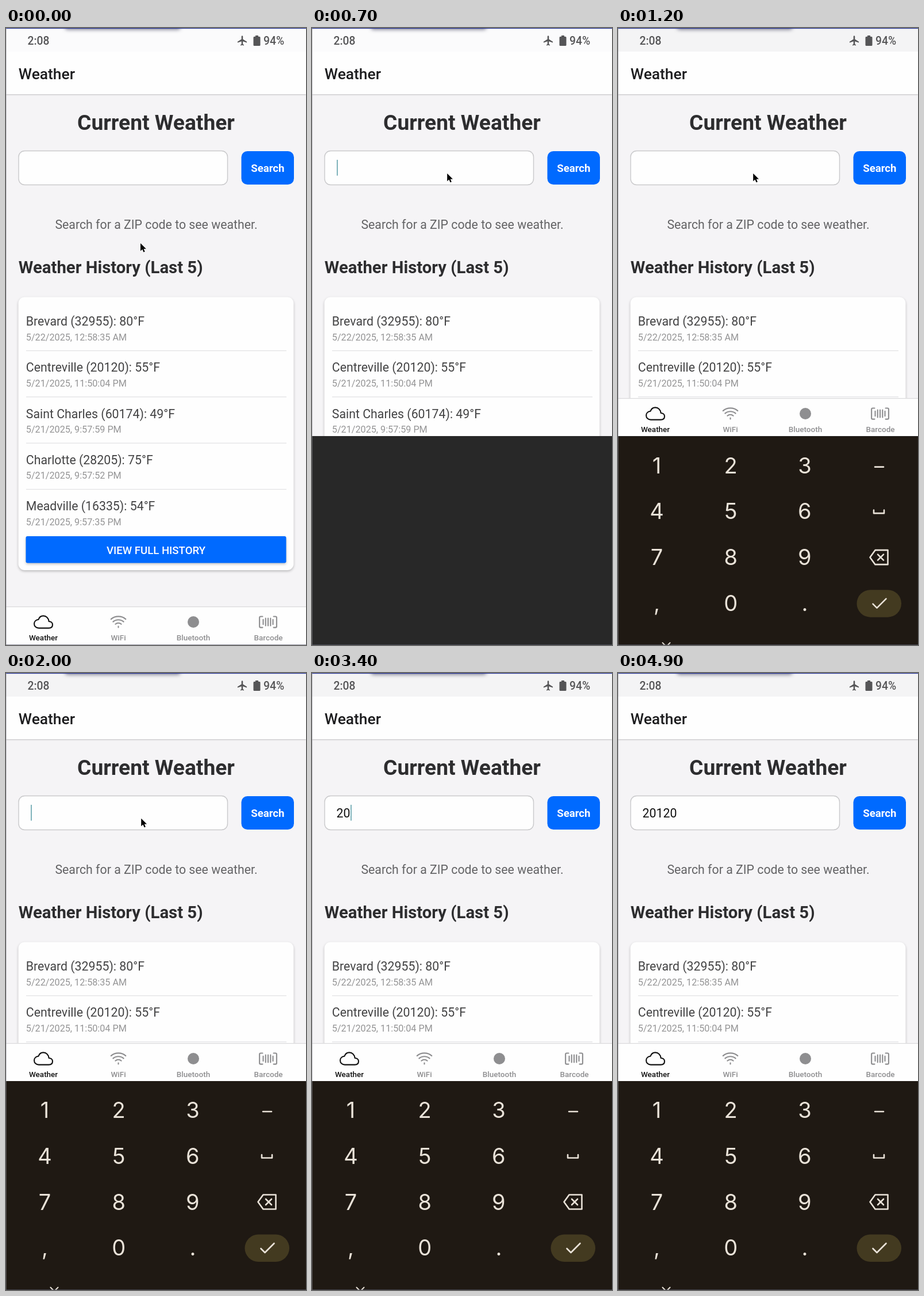
These frames come from a looping animation (522x1072 px, 5 s). An HTML page:

```html
<!DOCTYPE html>
<html lang="en">
<head>
<meta charset="utf-8">
<title>Weather search</title>
<style>
  html, body { margin: 0; width: 100%; height: 100%; overflow: hidden; background: #f5f4f6; }
  svg { display: block; width: 100vw; height: 100vh; font-family: Roboto, Arial, sans-serif; }
  .mid { text-anchor: middle; }
  .line { fill: none; stroke-linecap: round; stroke-linejoin: round; }
  .item { font-size: 21.3px; fill: #434344; }
  .date { font-size: 16.2px; fill: #949495; }
  .tab { font-size: 13.5px; font-weight: 500; }
  .key { font: 38px Inter, Roboto, sans-serif; fill: #e9e2d8; }
  .soft { filter: drop-shadow(0 2px 2px rgba(0, 0, 0, .24)); }
  .flat { filter: drop-shadow(0 1px 1px rgba(0, 0, 0, .22)); }
  .notch { filter: drop-shadow(0 2px 3px rgba(20, 20, 50, .5)); }
</style>
</head>
<body>
<svg viewBox="0 0 522 1072">
  <rect width="522" height="1072" fill="#f5f4f6"/>

  <!-- header -->
  <rect class="flat" width="522" height="115" fill="#fefefe"/>
  <rect id="status" width="522" height="41"/>
  <rect class="notch" x="103" y="-8" width="200" height="9" rx="4" fill="#222234"/>
  <rect width="522" height="1.2" fill="#263391"/>
  <g fill="#555557" font-size="19.3" font-weight="500">
    <text x="37.5" y="28.5">2:08</text>
    <text x="448" y="28.5">94%</text>
    <path transform="translate(401.2 11.8) scale(.85)" d="M21 16v-2l-8-5V3.5c0-.83-.67-1.5-1.5-1.5S10 2.67 10 3.5V9l-8 5v2l8-2.5V19l-2 1.5V22l3.5-1 3.5 1v-1.5L13 19v-5.5l8 2.5z"/>
    <path d="M434 15v-2h5v2h2q1.5 0 1.5 1.5v13q0 1.5-1.5 1.5h-9q-1.5 0-1.5-1.5v-13q0-1.5 1.5-1.5z"/>
  </g>
  <text x="21.8" y="89" font-size="26.4" font-weight="500" fill="#1c1c1e">Weather</text>

  <!-- search -->
  <text class="mid" x="261" y="177" font-size="37.2" font-weight="700" fill="#2d2d2f">Current Weather</text>
  <rect x="22" y="213.5" width="363.5" height="59" rx="10.5" fill="#fefefe" stroke="#c9c9cb" stroke-width="1.4"/>
  <rect x="409.5" y="214" width="91.5" height="58" rx="10.5" fill="#006aff"/>
  <text class="mid" x="455.3" y="250" font-size="18.6" font-weight="700" fill="#fff">Search</text>
  <text class="mid" x="261.5" y="348.5" font-size="21.3" fill="#636365">Search for a ZIP code to see weather.</text>
  <text id="zip" x="42.6" y="251" font-size="21.3" fill="#111"></text>
  <rect id="caret" y="229" width="2" height="27.5" fill="#7fb3bb"/>

  <!-- history -->
  <text x="21.8" y="426" font-size="29.3" font-weight="700" fill="#2d2d2f">Weather History (Last 5)</text>
  <rect class="soft" x="21.5" y="467.5" width="479" height="474.5" rx="11" fill="#fefefe"/>
  <g id="history"></g>
  <rect class="soft" x="34.5" y="883" width="453" height="46.5" rx="3" fill="#006aff"/>
  <text class="mid" x="261" y="914" font-size="18.6" font-weight="500" fill="#fff">VIEW FULL HISTORY</text>

  <!-- keyboard -->
  <rect id="backdrop" y="709" width="522" height="363" fill="#282828"/>
  <g id="keyboard">
    <rect y="709" width="522" height="363" fill="#1f1913"/>
    <g id="keys"></g>
    <rect x="415.5" y="975.5" width="77.5" height="47.5" rx="23.7" fill="#433a20"/>
    <g class="line" stroke="#e9e2d8" stroke-width="2.6">
      <path d="M447 762h15M445 837v5.5h18v-5.5"/>
      <path d="M438.5 919l9-12.5h22v25h-22zM452 914l10 10m0-10l-10 10"/>
      <path d="M443.5 1000l7 7 16-16"/>
      <path d="M77.5 1067.5l6.5 6.5 6.5-6.5" stroke-width="2"/>
    </g>
  </g>

  <!-- tab bar -->
  <g id="tabs">
    <rect y="1005.5" width="522" height="65.5" fill="#fefefe"/>
    <rect y="1005" width="522" height="1.2" fill="#d9d9db"/>
    <g class="line" stroke="#8e8e90" stroke-width="32">
      <path stroke="#111" transform="translate(48 1015) scale(.0665)" d="M400 240c-8.9-89.5-71-144-144-144-69 0-113.4 48.2-128 96-60 6-112 43.6-112 112 0 66 54 112 120 112h260c55 0 100-27.4 100-88 0-59.8-53-85.8-96-88z"/>
      <path transform="translate(178.5 1015) scale(.0665)" d="M332 311a115 115 0 0 0-153 0M393 250c-75-68-200-68-275 0M448 182c-106-95-277-95-384 0M256 370v28"/>
      <path transform="translate(439 1015) scale(.0665)" d="M400 400h48a32 32 0 0 0 32-32v-224a32 32 0 0 0-32-32h-48M112 112h-48a32 32 0 0 0-32 32v224a32 32 0 0 0 32 32h48M384 192v128M320 160v192M256 160v192M192 160v192M128 192v128"/>
    </g>
    <circle cx="326" cy="1032" r="10" fill="#8e8e90"/>
    <g id="labels"></g>
  </g>
  <rect width="1" height="1072" fill="#8a8a92" opacity=".45"/>
  <rect y="1071" width="522" height="1" fill="#55586a" opacity=".6"/>

  <path id="mouse" d="M0 0v13.5l3.2-2.9 2.2 5 2.3-1-2.2-4.9h4.3z" fill="#000" stroke="#fff" stroke-width="1" paint-order="stroke"/>
</svg>
<script>
  const $ = id => document.getElementById(id);
  const text = (cls, x, y, s, extra = '') => `<text class="${cls}" x="${x}" y="${y}" ${extra}>${s}</text>`;

  $('history').innerHTML = [
    ['Brevard (32955): 80°F', '5/22/2025, 12:58:35 AM'],
    ['Centreville (20120): 55°F', '5/21/2025, 11:50:04 PM'],
    ['Saint Charles (60174): 49°F', '5/21/2025, 9:57:59 PM'],
    ['Charlotte (28205): 75°F', '5/21/2025, 9:57:52 PM'],
    ['Meadville (16335): 54°F', '5/21/2025, 9:57:35 PM']
  ].map(([place, date], i) => {
    const y = 80.3 * i;
    const rule = i < 4 ? `<rect x="35" y="${560 + y}" width="453" height="1.3" fill="#e3e3e5"/>` : '';
    return text('item', 34.8, 517 + y, place) + text('date', 34.8, 542.5 + y, date) + rule;
  }).join('');

  $('keys').innerHTML = [...'123456789,0.'].map((c, i) =>
    text('key mid', 67.5 + 128.7 * (i % 3), 773 + 79.8 * Math.floor(i / 3), c)).join('');

  $('labels').innerHTML = ['Weather', 'WiFi', 'Bluetooth', 'Barcode'].map((s, i) =>
    text('tab mid', 65 + 130.5 * i, 1064, s, `fill="${i ? '#8e8e90' : '#111'}"`)).join('');

  const LOOP = 5000, STEP = 100, CLICK = 600, BLINK = 500;
  const ZIP = '20120', KEY_TIMES = [2700, 3100, 3500, 3800, 4100];

  const show = (id, on) => $(id).setAttribute('visibility', on ? 'visible' : 'hidden');
  const move = (id, x, y) => $(id).setAttribute('transform', `translate(${x} ${y})`);
  const smooth = p => p * p * (3 - 2 * p);

  function draw(t) {
    const glide = smooth(Math.min(1, t / CLICK));
    move('mouse', 234 + 1.2 * glide, 374 - 121.3 * glide);
    show('mouse', t < KEY_TIMES[0]);

    const typed = KEY_TIMES.filter(k => k <= t);
    const since = t - (typed.length ? typed[typed.length - 1] : CLICK);
    $('zip').textContent = ZIP.slice(0, typed.length);
    $('caret').setAttribute('x', 43 + 12 * typed.length);
    show('caret', since >= 0 && since % (2 * BLINK) < BLINK);

    show('backdrop', t >= 700);
    show('keyboard', t >= 800);
    move('keyboard', 0, 44 * .35 ** ((t - 800) / 100));
    show('tabs', t < 700 || t >= 800);
    move('tabs', 0, t < 700 ? 0 : -362);
    $('status').setAttribute('fill', t < 1200 ? '#fbfbfc' : '#f4f4f5');
  }

  const start = performance.now();
  function tick() {
    const t = (performance.now() - start) % LOOP;
    draw(Math.floor(t / STEP) * STEP);
    requestAnimationFrame(tick);
  }
  tick();
</script>
</body>
</html>
```
